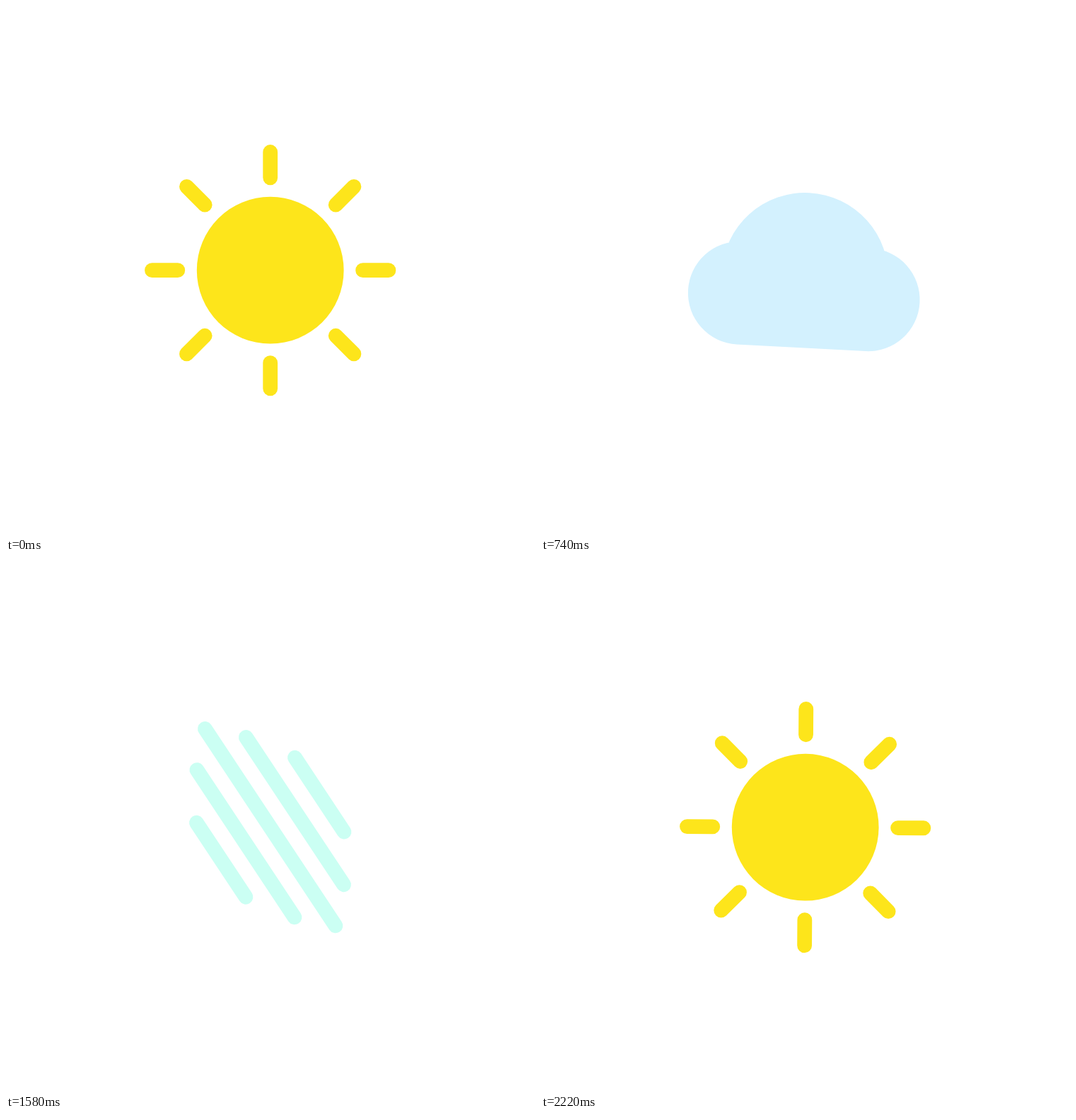
Write an HTML page with a canvas that moves like this. It is 748 px wide and 748 px high and loops after 2.24 s.

```html
<!DOCTYPE html>
<html lang="en">
<head>
<meta charset="utf-8">
<title>Weather loader</title>
<style>
html, body { margin: 0; width: 100%; height: 100%; overflow: hidden; background: #fff; }
canvas { display: block; width: 748px; height: 748px; }
</style>
</head>
<body>
<canvas id="stage" width="748" height="748"></canvas>
<script>
const ctx = document.getElementById('stage').getContext('2d');
const SIZE = 748, CENTER = 373.7, LOOP = 2240, STEP = 20, SLOT = 545;
const LINE = 20.8, ROW = 41.7;
const clamp = (v, lo, hi) => Math.min(hi, Math.max(lo, v));
const turn = deg => ctx.rotate(deg * Math.PI / 180);

function line(x1, y1, x2, y2) {
  ctx.beginPath();
  ctx.moveTo(x1, y1);
  ctx.lineTo(x2, y2);
  ctx.stroke();
}

function sun() {
  ctx.beginPath();
  ctx.arc(0, 0, 103.9, 0, Math.PI * 2);
  ctx.fill();
  for (let i = 0; i < 8; i++) {
    line(0, -130.9, 0, -167.2);
    turn(45);
  }
}

function cloud() {
  ctx.beginPath();
  ctx.arc(0, 8, 117.7, Math.PI, Math.PI * 2);
  ctx.closePath();
  for (const x of [-91.2, 91.2]) {
    ctx.moveTo(x + 72.8, 36.9);
    ctx.arc(x, 36.9, 72.8, 0, Math.PI * 2);
  }
  ctx.rect(-91.2, 0, 182.4, 109.7);
  ctx.fill();
}

// Bars grow from their middle, one after the other: row, start, final half length
const BARS = [[-2, 260, 63], [-1, 107, 125], [0, 0, 167], [1, 158, 125], [2, 260, 63]];

function fog(t) {
  for (const [row, start, full] of BARS) {
    const half = clamp((t - start) * 0.555, 0.01, full);
    line(-half, row * ROW, half, row * ROW);
  }
}

const SHORT = [[39.6, -137.2], [52.4, -129], [52.4, -111]];
const LONG = [[45, -138], [59.5, -128.9], [59.5, -112.7]];
const LONG_LEFT = [2, 5], LONG_RIGHT = [0, 1, 4];

function snowflake() {
  ctx.beginPath();
  for (let i = 0; i < 6; i++) {
    const a = i * Math.PI / 3, cos = Math.cos(a), sin = Math.sin(a);
    const side = branch => [[15, -170], [15, -122.5], ...branch, [15, -90.6], [15, -59.6]];
    const left = side(LONG_LEFT.includes(i) ? LONG : SHORT).map(([x, y]) => [-x, y]).reverse();
    const right = side(LONG_RIGHT.includes(i) ? LONG : SHORT);
    const arm = [[-43, -74.5], ...left, [0, -179.3], ...right];
    arm.forEach(([x, y], j) => {
      const method = i + j ? 'lineTo' : 'moveTo';
      ctx[method](x * cos - y * sin, x * sin + y * cos);
    });
  }
  ctx.closePath();
  for (let i = 0; i < 6; i++) {
    const a = i * Math.PI / 3;
    ctx[i ? 'lineTo' : 'moveTo'](26 * Math.cos(a), 26 * Math.sin(a));
  }
  ctx.closePath();
  ctx.fill('evenodd');
}

const ICONS = [
  { draw: sun, color: '#fde51b', angle: t => 26.7 * (t / 320) ** 2.06 },
  { draw: cloud, color: '#d3f1fe', angle: t => 3.05 * (t / 195) ** 3 },
  { draw: fog, color: '#b9ffef', angle: t => 0.2 * (Math.max(0, t - 230) / 20) ** 2.2 },
  { draw: snowflake, color: '#ddf5fe', angle: t => 0.8 * (t / 185) ** 3 }
];

function render(now) {
  const time = Math.floor(now % LOOP / STEP) * STEP;
  const slot = Math.floor(time / SLOT), t = time - slot * SLOT;
  const icon = ICONS[slot % ICONS.length];
  ctx.clearRect(0, 0, SIZE, SIZE);
  ctx.save();
  ctx.translate(CENTER, CENTER);
  turn(icon.angle(t));
  ctx.globalAlpha = 1 - clamp((t - 440) / 190, 0, 1);
  ctx.fillStyle = ctx.strokeStyle = icon.color;
  ctx.lineWidth = LINE;
  ctx.lineCap = 'round';
  icon.draw(t);
  ctx.restore();
}

let origin;
function tick(now) {
  origin ??= now;
  render(Math.max(0, now - origin));
  requestAnimationFrame(tick);
}
render(0);
requestAnimationFrame(tick);
</script>
</body>
</html>
```
